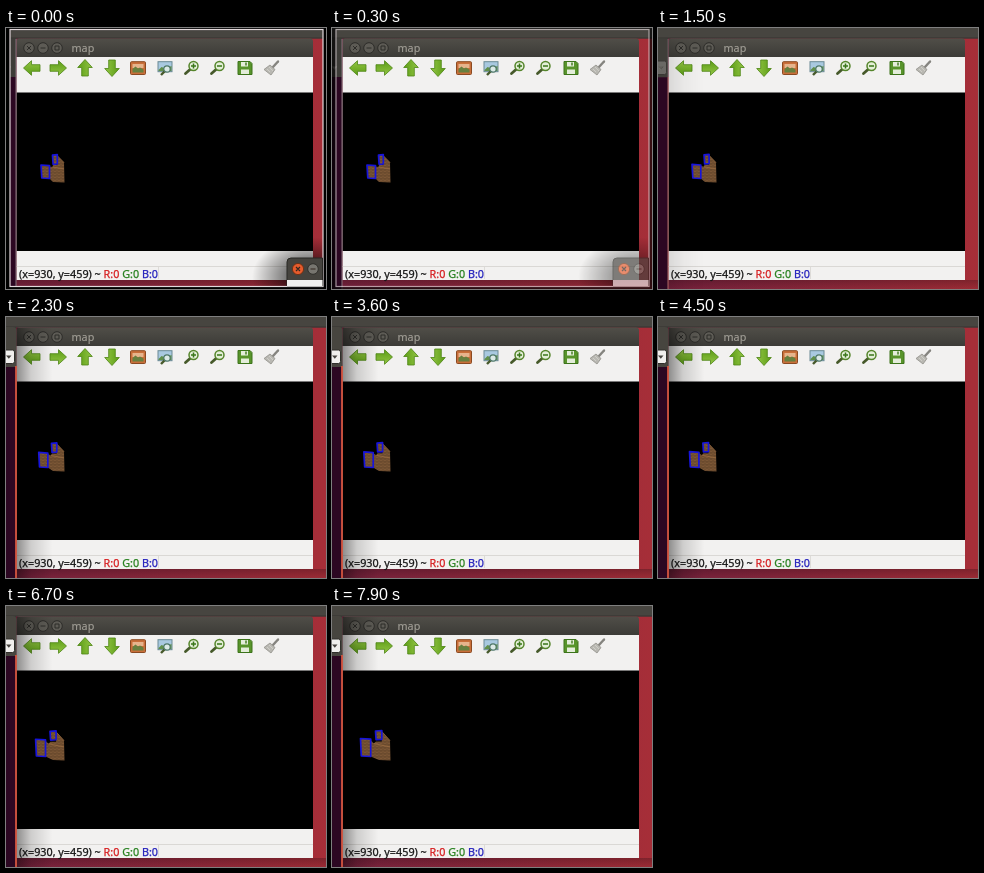
Recreate the animation shown at these times as an HTML page. Size 320 by 261 pixels, loop 8 s.

```html
<!DOCTYPE html>
<html lang="en">
<head>
<meta charset="utf-8">
<title>Map window</title>
<style>
html, body { margin: 0; width: 100%; height: 100%; overflow: hidden; background: #000; }
svg { display: block; width: 100vw; height: 100vh; }
text { font-family: "Noto Sans", "Open Sans", sans-serif; white-space: pre; }
</style>
</head>
<body>
<svg viewBox="0 0 320 261" preserveAspectRatio="none">
  <defs>
    <linearGradient id="desk">
      <stop offset="0" stop-color="#7b2340"/><stop offset="1" stop-color="#a62e38"/>
    </linearGradient>
    <linearGradient id="bar" x1="0" y1="0" x2="0" y2="1">
      <stop offset="0" stop-color="#504e48"/><stop offset="1" stop-color="#3c3b37"/>
    </linearGradient>
    <linearGradient id="shade" x1="0" y1="0" x2="0" y2="1">
      <stop offset="0" stop-color="#200810" stop-opacity=".3"/><stop offset="1" stop-color="#200810" stop-opacity=".08"/>
    </linearGradient>
    <linearGradient id="cast">
      <stop offset="0" stop-color="#000" stop-opacity=".42"/><stop offset=".4" stop-color="#000" stop-opacity=".15"/><stop offset="1" stop-color="#000" stop-opacity="0"/>
    </linearGradient>
    <radialGradient id="glow">
      <stop offset=".4" stop-color="#000" stop-opacity=".5"/><stop offset="1" stop-color="#000" stop-opacity="0"/>
    </radialGradient>
    <linearGradient id="leaf" x1="0" y1="0" x2="0" y2="1">
      <stop offset="0" stop-color="#93c544"/><stop offset="1" stop-color="#5c9d16"/>
    </linearGradient>
    <pattern id="brick" width="4" height="3" patternUnits="userSpaceOnUse">
      <path d="M0 0h4v3H0z" fill="#87603b"/>
      <path d="M0 .4h4M0 1.9h4M1 .4v1.5M3 1.9v1.1" stroke="#573b24" stroke-width=".6"/>
    </pattern>
    <path id="arrow" d="M-8.500 0L-.5-7.300v4H8v6.600H-.5v4z" fill="url(#leaf)" stroke="#4c8512" stroke-width=".8" stroke-linejoin="round"/>
    <g id="lens">
      <path d="M-2 2l-4.500 4" stroke="#46592a" stroke-width="2.800" stroke-linecap="round"/>
      <circle cx="1.500" cy="-1.500" r="4.500" fill="#e3eed7" stroke="#55852b" stroke-width="1.500"/>
    </g>
  </defs>

  <rect width="320" height="261" fill="url(#desk)"/>
  <rect y="252" width="320" height="9" fill="url(#shade)"/>

  <!-- terminal at the left edge -->
  <rect y="10" width="10" height="40" fill="#3d3c38"/>
  <rect y="49" width="10" height="212" fill="#2c0722"/>
  <path id="dimArrow" d="M0 38.500h5l-2.500 3.500z" fill="#77756f"/>

  <rect width="320" height="10.500" fill="#474540"/>
  <path d="M0 10h320" stroke="#312f2c" stroke-width=".8"/>

  <!-- map window -->
  <path d="M10.500 29V13q0-2.500 3-2.500h290.500q3 0 3 3V29z" fill="url(#bar)"/>
  <g fill="#5d5b55" stroke="#2d2c29">
    <circle cx="23" cy="20" r="5.300"/><circle cx="37" cy="20" r="5.300"/><circle cx="51" cy="20" r="5.300"/>
    <path d="M21 18l4 4m0-4l-4 4M34.500 20h5M49 18h4v4h-4z" fill="none"/>
  </g>
  <text x="65.500" y="24" font-size="10.800" fill="#a19e96" stroke="#a19e96" stroke-width=".15">map</text>
  <rect x="10.500" y="29" width="296.500" height="223" fill="#f2f1f0"/>
  <rect x="10.500" y="64.500" width="296.500" height="158.500" fill="#000"/>
  <path d="M10.500 238.500h296.500" stroke="#dad8d5"/>
  <path d="M152.500 239v12" stroke="#dddbd8"/>

  <use href="#arrow" x="26" y="40"/>
  <use href="#arrow" transform="translate(52 40) rotate(180)"/>
  <use href="#arrow" transform="translate(79 40) rotate(90)"/>
  <use href="#arrow" transform="translate(106 40) rotate(-90)"/>
  <g transform="translate(132 40)">
    <rect x="-7.500" y="-6.300" width="15" height="12.800" rx="1" fill="#c96f3a" stroke="#8a4a22"/>
    <path d="M-5.500-4h11v4h-11z" fill="#e6b48c"/>
    <path d="M-5.500 4.500v-3.500l3-2.500 2.500 2 2-1 3.500 2v3z" fill="#66803f"/>
  </g>
  <g transform="translate(159 40)">
    <rect x="-7" y="-6.300" width="14" height="10" fill="#a9c9e0" stroke="#6a8a94"/>
    <path d="M-6.500 2l3-3 4 1.500 6-2.500v5h-13z" fill="#61904a"/>
    <path d="M0 3l-4 4" stroke="#46592a" stroke-width="2.400"/>
    <circle cx="2" cy="1" r="3.200" fill="#dbe9e6" stroke="#4d7768" stroke-width="1.200"/>
  </g>
  <g transform="translate(186 39.500)"><use href="#lens"/><path d="M-1-1.500h5M1.500-4v5" stroke="#397519" stroke-width="1.500"/></g>
  <g transform="translate(212 39.500)"><use href="#lens"/><path d="M-1-1.500h5" stroke="#397519" stroke-width="1.500"/></g>
  <g transform="translate(239 40)">
    <path d="M-7-6.500H5l2 2v11H-7z" fill="#58942b" stroke="#3c731b"/>
    <path d="M-4-6h7v4.500h-7zM-4 1.500h8V6h-8z" fill="#e4edda"/>
    <path d="M1-5.500v3" stroke="#477d24" stroke-width="1.500"/>
  </g>
  <g transform="translate(265 40)">
    <path d="M2-1l5-5.500" stroke="#85847f" stroke-width="2.400" stroke-linecap="round"/>
    <path d="M-1-3l5 4.500-4 5.500-7-5.500z" fill="#b9b8b2" stroke="#92918b" stroke-width=".8"/>
    <path d="M-4 1l3 3M-2-1l4 4" stroke="#d8d7d2" stroke-width=".7"/>
  </g>

  <g font-size="10.800" stroke-width=".25">
    <text x="13" y="249.700" fill="#151515" stroke="#151515">(x=930, y=459) ~ <tspan fill="#d61e20" stroke="#d61e20">R:0</tspan> <tspan fill="#26801e" stroke="#26801e">G:0</tspan> <tspan fill="#2522bd" stroke="#2522bd">B:0</tspan></text>
  </g>

  <path id="dimEdge" d="M10 11V261" stroke="#85757d"/>
  <g id="active">
    <rect x="10.500" y="11" width="36" height="250" fill="url(#cast)"/>
    <path d="M0 10h7q3.500 0 3.500 4v36H0z" fill="#47453f"/>
    <rect x="-3" y="33" width="11.500" height="13.500" rx="2" fill="#f0efed" stroke="#302f2b"/>
    <path d="M0 38.500h5.500l-2.700 3.300z" fill="#45433f"/>
    <path d="M10 49V261" stroke="#d4553f" stroke-width="1.800"/>
  </g>

  <!-- stepped block -->
  <path id="wall" fill="url(#brick)"/>
  <path id="rim" fill="none" stroke="#a17145" stroke-width=".7"/>
  <g fill="url(#brick)" stroke="#1714dc" stroke-width="1.700" stroke-linejoin="round">
    <path id="upper"/><path id="lower"/>
  </g>

  <!-- capture outline and small dialog -->
  <g id="capture">
    <ellipse cx="304" cy="249" rx="58" ry="40" fill="url(#glow)"/>
    <path d="M0 0h320v261H0zM4 1.500v257h313V1.500z" fill="#000" fill-rule="evenodd"/>
    <rect x="4" y="1.500" width="313" height="257" fill="none" stroke="#e2d8db" stroke-width="1.200"/>
    <path d="M281 258V234q0-4 4-4h31.500v28z" fill="#45433e" stroke="#292824"/>
    <path d="M281 252h35.500v6.500h-35.500z" fill="#f2f1f0"/>
    <circle cx="292" cy="241" r="5.600" fill="#e65b2c" stroke="#713216"/>
    <circle cx="307" cy="241" r="5.300" fill="#77756f" stroke="#302f2b"/>
    <path d="M290 239l4 4m0-4l-4 4M304.500 241h5" stroke="#33261f" stroke-width="1.200"/>
  </g>
</svg>
<script>
const LOOP = 8000;
const el = id => document.getElementById(id);
const mix = (a, b, k) => a + (b - a) * k;
const ramp = (t, a, b) => Math.max(0, Math.min(1, (t - a) / (b - a)));
const stepFade = (t, start, n) => t < start ? 0 : Math.min(1, (Math.floor((t - start) / 100) + 1) / n);
const ticks = [0, 500, 800, 1300, 1600, 2000, 2300, 2800, 3200, 3600, 4000, 4400,
  4800, 5200, 5600, 5900, 6300, 6700, 7000, 7400, 7900];
const turn = [[0, 0], [800, .05], [2300, .35], [3600, .48], [5600, .62], [6700, .83], [7900, 1]];

function turnAt(t) {
  const i = Math.max(1, turn.findIndex(p => p[0] >= t));
  const [a, b] = [turn[i - 1], turn[i]];
  return mix(a[1], b[1], ramp(t, a[0], b[0]));
}

function drawBlock(k) {
  const left = mix(35, 28.5, k), right = mix(43.5, 38.7, k);
  const top = mix(137, 132.5, k), base = 150.5;
  const upLeft = mix(46.5, 43.5, k), upRight = mix(51.3, 49.8, k);
  const upTop = mix(126.7, 124.5, k), upBase = mix(136, 133.3, k);
  const ledge = mix(137, 135.5, k);
  el('lower').setAttribute('d',
    `M${left} ${top}L${right} ${top + .7}V${base}L${left + .8} ${base - .5}Z`);
  el('upper').setAttribute('d',
    `M${upLeft} ${upTop + .5}L${upRight} ${upTop}V${upBase}L${upLeft + .6} ${upBase + .3}Z`);
  el('wall').setAttribute('d',
    `M${upRight} ${upTop + 1}L58 134.5L58.5 154.5L47 154L${right} ${base}V${top + 1.5}L${right + 3} ${ledge + 2}L${upLeft + .5} ${ledge}H${upRight}Z`);
  el('rim').setAttribute('d', `M${upRight} ${upTop + 1}L58 134.5M${right + 3} ${ledge + 2}L58 141`);
}

function draw(t) {
  const focus = stepFade(t, 1500, 4);
  el('capture').setAttribute('opacity', 1 - stepFade(t, 300, 3));
  el('active').setAttribute('opacity', focus);
  el('dimEdge').setAttribute('opacity', 1 - focus);
  el('dimArrow').setAttribute('opacity', 1 - focus);
  drawBlock(turnAt(ticks.filter(s => s <= t).pop()));
}

function loop() {
  draw(performance.now() % LOOP);
  requestAnimationFrame(loop);
}
loop();
</script>
</body>
</html>
```
